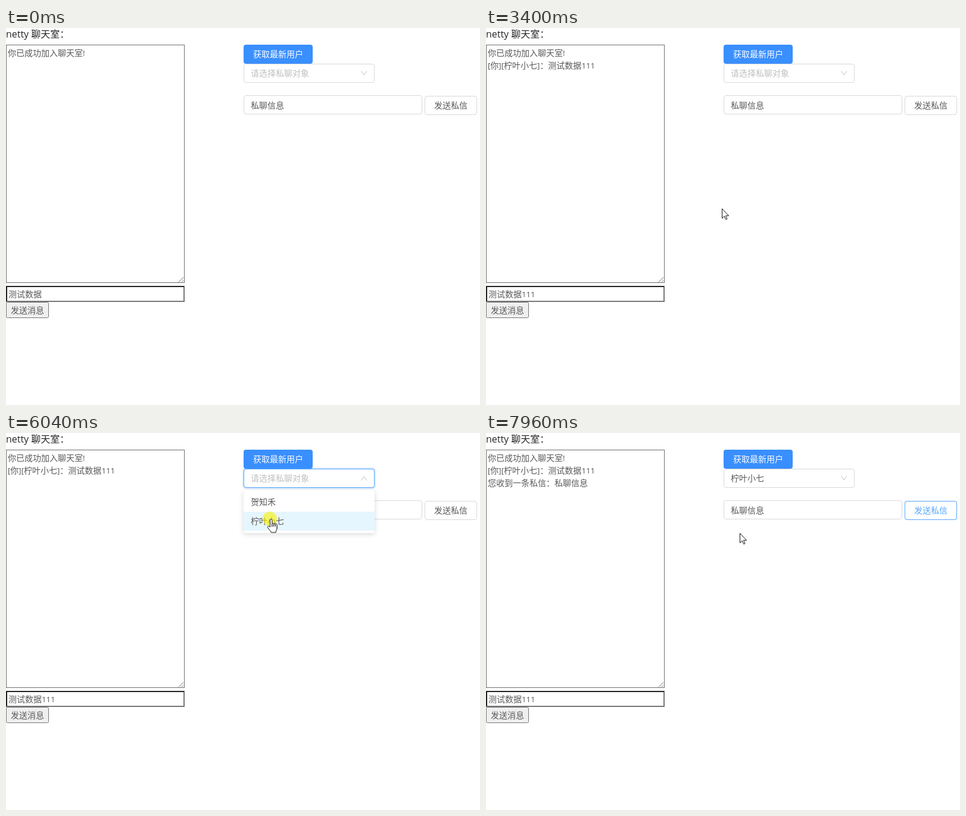
An HTML page for the animation above (8 s loop, 796 by 633 pixels).

```html
<!DOCTYPE html>
<html lang="zh-CN">
<head>
<meta charset="utf-8">
<title>netty 聊天室</title>
<style>
  html, body { margin: 0; width: 100%; height: 100%; overflow: hidden; background: #fff; }
  svg { display: block; width: 796px; height: 633px; }
  text { font: 14px "Open Sans", "Noto Sans CJK SC", "Noto Sans CJK", sans-serif; fill: #595959; white-space: pre; }
  .title { font-size: 16px; fill: #262626; }
  .card { filter: drop-shadow(0 2px 4px rgba(0, 0, 0, .15)); }
</style>
</head>
<body>
<svg id="stage" viewBox="0 0 796 633" xmlns="http://www.w3.org/2000/svg"></svg>
<script>
const LOOP = 8000, PRESS = 160;
const FRIEND = '柠叶小七', OTHER = '贺知禾';
const PRIMARY = '#3a8fff', BLUE = '#58a8ff', GREY = '#d9d9d9';
const $ = id => document.getElementById(id);

// Hit areas: x, y, width, height
const area = {
  log: [0, 28, 300, 400],
  input: [0, 433, 300, 27],
  send: [0, 460, 72, 27],
  fetch: [399, 28, 116, 32],
  pick: [399, 60, 220, 32],
  menu: [399, 96, 220, 72],
  note: [399, 113, 300, 32],
  mail: [703, 114, 88, 32]
};

// Pointer moves: start, end, x, y, time of a press there
const moves = [
  [280, 600, 66, 449, 680],
  [840, 1320, 56, 474],
  [1400, 1480, 79, 449, 1480],
  [2360, 2600, 30, 472, 2620],
  [2760, 3400, 396, 303],
  [3400, 3720, 425, 237],
  [3790, 4300, 470, 125, 4360],
  [4640, 4830, 508, 79, 4840],
  [5060, 5380, 458, 138],
  [5500, 5720, 443, 144, 6040],
  [6440, 6800, 733, 136],
  [6840, 6960, 735, 134, 7040],
  [7220, 7740, 429, 167],
  [7890, 7950, 426, 168]
];
const [focusAt, , sendAt, noteAt, pickAt, chooseAt, mailAt] = moves.map(m => m[4]).filter(Boolean);
const openAt = pickAt + 200, chosenAt = chooseAt + PRESS;

// Latin runs are set slightly smaller than the Chinese glyphs beside them.
const mixed = s => s.replace(/[!-~]+/g, m => `<tspan font-size="13.2">${m}</tspan>`);
const text = (x, y, s, attr = '') => `<text x="${x}" y="${y}" ${attr}>${mixed(s)}</text>`;
const box = ([x, y, w, h], attr, inset = 0) =>
  `<rect x="${x + inset}" y="${y + inset}" width="${w - 2 * inset}" height="${h - 2 * inset}" ${attr}/>`;
const line = (r, attr) => box(r, attr, .5);

// A rounded field whose blue border and glow can fade in.
const field = id =>
  box(area[id], `id="${id}Glow" rx="5" fill="none" stroke="${PRIMARY}" stroke-opacity=".2" stroke-width="2"`, -1) +
  line(area[id], `rx="3.5" fill="#fff" stroke="${GREY}"`) +
  line(area[id], `id="${id}Edge" rx="3.5" fill="none" stroke="${BLUE}"`);

const chat = ['你已成功加入聊天室!', `[你][${FRIEND}]：测试数据111`, '您收到一条私信：私聊信息'];
const finger = i => i
  ? box([6.2 + 2.7 * i, 7.2 + .4 * i, 2.7, 9], 'rx="1.35"')
  : box([5.5, .6, 3.4, 15], 'rx="1.7"');

$('stage').innerHTML =
  '<text class="title" x="0" y="16"><tspan font-weight="500">netty</tspan> 聊天室：</text>' +
  line(area.log, 'fill="#fff" stroke="#6f6f6f"') +
  '<path d="M290 426.5l8-8M295 426.5l3-3" stroke="#666"/>' +
  chat.map((s, i) => text(3, 47 + 21 * i, s, `id="chat${i}"`)).join('') +

  '<g id="plain">' + box(area.input, 'fill="none" stroke="#767676" stroke-width="2"', 1) +
  '<path d="M0 460V433H300L298 435H2V458Z" fill="#212121"/></g>' +
  box(area.input, 'id="focus" rx="2.5" fill="#fff" stroke="#101010" stroke-width="2"', 1) +
  text(4, 452, '', 'id="typed"') +
  box([0, 438, 1, 18], 'id="caret" fill="#222"') +
  line(area.send, 'id="send" rx="2" stroke="#767676"') +
  text(8, 479, '发送消息') +

  box(area.fetch, `rx="4" fill="${PRIMARY}"`) +
  text(415, 49, '获取最新用户', 'style="fill:#fff"') +
  field('pick') +
  text(411, 81, '', 'id="choice"') +
  '<path id="arrow" d="M-4.5-3.7L0 2.9 4.5-3.7" fill="none" stroke="#bfbfbf"/>' +
  field('note') +
  text(411, 135, '私聊信息') +
  field('mail') +
  text(719, 135, '发送私信', 'id="mailText"') +

  '<g id="menu">' + box(area.menu, 'class="card" rx="4" fill="#fff"') +
  box([399, 100, 220, 32], 'id="hover" fill="#e6f6ff"') +
  text(411, 121, OTHER) + text(411, 153, FRIEND) + '</g>' +

  '<circle id="press" fill="#f8f000" fill-opacity=".62"/>' +
  '<g id="cursor" stroke="#111" fill="#fff" stroke-linejoin="round">' +
  '<path id="point" d="M.5.5V16.5L4.2 13 6.8 18.6 9 17.6 6.5 12.2H11.6Z"/>' +
  '<path id="beam" d="M-1.5-2.5h8M2.5-2.5v15M-1.5 12.5h8"/>' +
  '<g id="hand" transform="translate(-5 0)">' + [0, 1, 2, 3].map(finger).join('') +
  '<path d="M5.5 14C1.8 10.6.8 13.4 1.7 15c1.6 3 5 5 5.6 8h7.8c.3-3.5 1.9-4.5 1.9-7v-3.5"/></g></g>';

const clamp = v => Math.max(0, Math.min(1, v));
const ease = v => 1 - (1 - clamp(v)) ** 1.8;
const fade = (t, on, off = LOOP, ms = 300) => ease((t - on) / ms) - ease((t - off) / ms);
const within = (t, a, b) => t >= a && t < b;
const set = (id, attrs) => { for (const k in attrs) $(id).setAttribute(k, attrs[k]); };
const show = (id, v) => set(id, { opacity: +v });

// Each move starts where the previous one ended.
function pointer(t) {
  let x = 0, y = 479;
  for (const [a, b, tx, ty] of moves) {
    const k = ease((t - a) / (b - a));
    x += (tx - x) * k;
    y += (ty - y) * k;
  }
  return [x, y];
}

function shapeAt(over, open) {
  if (open && over('menu')) return 'hand';
  if (['fetch', 'pick', 'mail'].some(over)) return 'hand';
  return ['log', 'input', 'note'].some(over) ? 'beam' : 'point';
}

function draw(t) {
  const [x, y] = pointer(t);
  const over = id => {
    const [l, top, w, h] = area[id];
    return t >= 280 && within(x, l, l + w) && within(y, top, top + h);
  };

  // Public chat
  const focused = within(t, focusAt, sendAt);
  const ones = Math.max(0, Math.min(3, Math.floor((t - 1600) / 240)));
  $('typed').innerHTML = mixed('测试数据' + '1'.repeat(ones));
  show('plain', !focused);
  show('focus', focused);
  show('caret', focused);
  set('caret', { x: Math.round(60 + ones * 7.55) });
  set('send', { fill: over('send') ? '#e5e5e5' : '#efefef' });
  show('chat1', t >= sendAt + PRESS);
  show('chat2', t >= mailAt + PRESS);

  // Select and its list
  const chosen = t >= chosenAt;
  $('choice').textContent = chosen ? FRIEND : '请选择私聊对象';
  $('choice').style.fill = chosen ? '#595959' : '#bfbfbf';
  show('pickEdge', fade(t, pickAt - 80, mailAt));
  show('pickGlow', fade(t, openAt, mailAt));
  set('arrow', { transform: `translate(601 76) rotate(${180 * fade(t, openAt - 65, chosenAt)})` });
  const m = fade(t, openAt, chosenAt, 200), s = .8 + .2 * m;
  show('menu', m);
  set('menu', { transform: `translate(0 ${96 * (1 - s)}) scale(1 ${s})` });
  set('hover', { y: t > openAt && y >= 132 ? 132 : 100 });

  // Private message: hover and focus tints, then a ring spreading from the button
  show('noteEdge', fade(t, noteAt - 120, openAt) + fade(t, 6460, 6740));
  show('noteGlow', fade(t, noteAt, openAt));
  const lit = fade(t, 6790);
  show('mailEdge', lit);
  $('mailText').style.fill = `color-mix(in srgb, ${BLUE} ${lit * 100}%, #595959)`;
  const ring = (t - mailAt - PRESS / 2) / 500;
  set('mailGlow', { 'stroke-width': 2 + 8 * ease(ring) });
  show('mailGlow', ring > 0 ? clamp(1 - ring) : 0);

  // Pointer
  const down = moves.some(p => within(t, p[4], p[4] + PRESS));
  set('press', { cx: x, cy: y, r: down ? 12 : within(t, chooseAt - PRESS, chooseAt) ? .8 : 0 });
  show('cursor', t >= 280);
  set('cursor', { transform: `translate(${Math.round(x)} ${Math.round(y)})` });
  const shape = shapeAt(over, within(t, openAt, chosenAt + 200));
  for (const id of ['point', 'beam', 'hand']) show(id, id === shape);
}

function tick() {
  draw(performance.now() % LOOP);
  requestAnimationFrame(tick);
}
tick();
</script>
</body>
</html>
```
